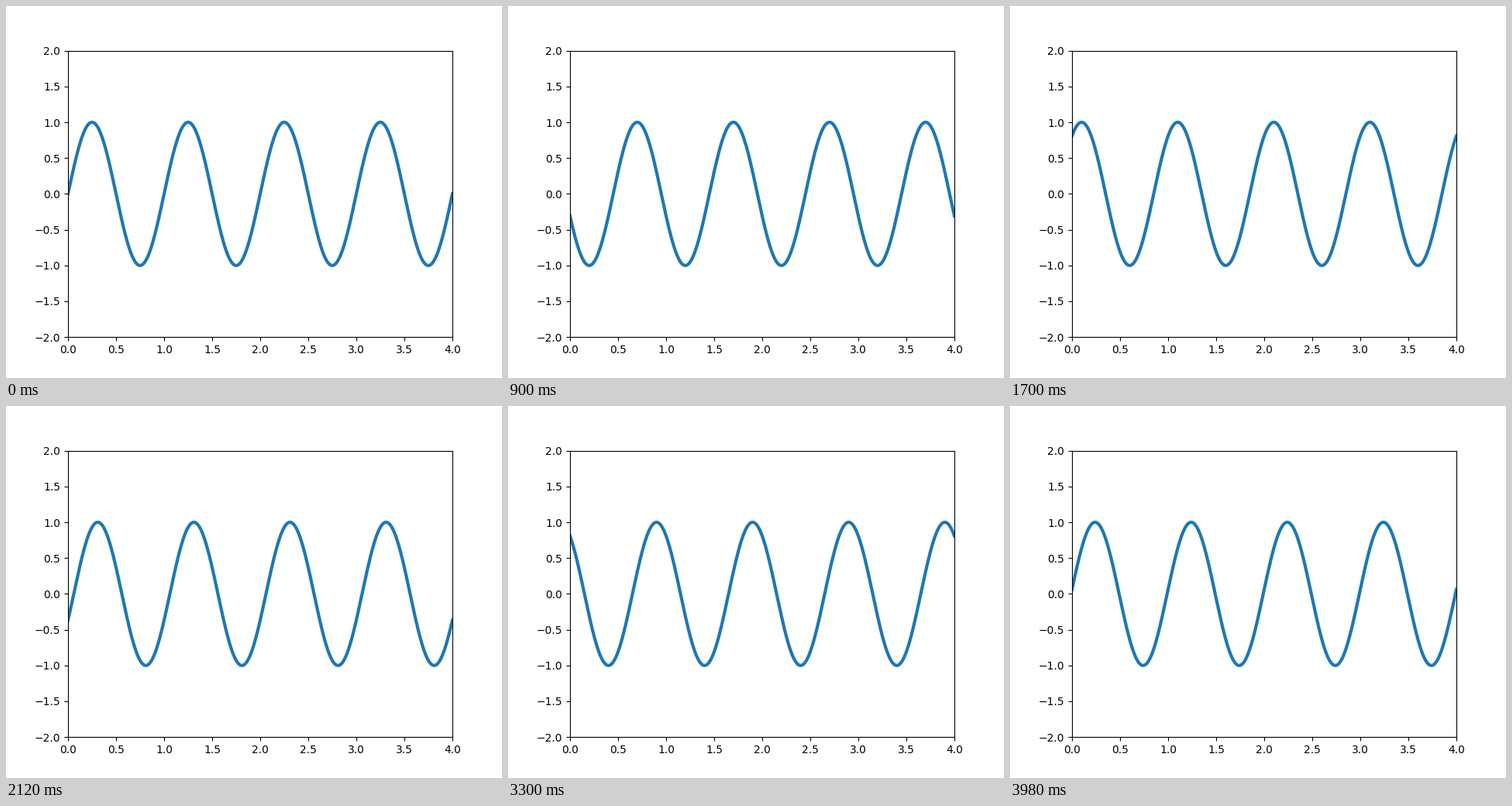
A matplotlib script that plays this animation: 640 by 480 pixels, repeating every 4 s.

```python
import numpy as np
import matplotlib.pyplot as plt
from matplotlib.animation import FuncAnimation

FRAMES = 200
INTERVAL = 20  # ms
STEP = 0.01    # shift to the right per frame, in x units

fig = plt.figure(figsize=(6.4, 4.8), dpi=100)
ax = plt.axes(xlim=(0, 4), ylim=(-2, 2))
x = np.linspace(0, 4, 1000)
line, = ax.plot([], [], lw=3)


def update(i):
    line.set_data(x, np.sin(2 * np.pi * (x - STEP * i)))
    return line,


def init():
    return update(0)


anim = FuncAnimation(fig, update, init_func=init, frames=FRAMES,
                     interval=INTERVAL, repeat=True, repeat_delay=0,
                     blit=False)
plt.show()
```
